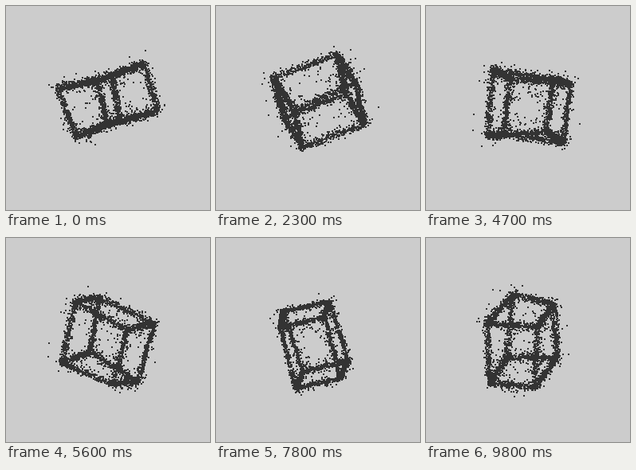
An HTML page with a canvas for the animation above (10000 ms loop, 256 by 256 pixels).

```html
<!DOCTYPE html>
<html>
<head>
<meta charset="utf-8">
<style>
html, body { margin: 0; width: 100%; height: 100%; overflow: hidden; background: #ccc; }
canvas { display: block; }
</style>
</head>
<body>
<canvas id="stage" width="256" height="256"></canvas>
<script>
const ctx = document.getElementById('stage').getContext('2d');
const LOOP = 10000;

// Key poses of the tumbling box: time, scatter, then the x,y of its 8 corners.
// The bits of a corner's index tell its side along each of the three axes.
const poses = [
  { t: 0, spread: 1, at: [65,104, 88,164, 133,87, 143,145, 115,95, 126,147, 173,72, 190,132] },
  { t: 2300, spread: 1.1, at: [72,90, 98,131, 152,61, 175,97, 86,140, 108,178, 163,110, 187,148] },
  { t: 3800, spread: 1.1, at: [80,82, 97,110, 162,72, 175,93, 86,162, 93,175, 164,131, 179,162] },
  { t: 5600, spread: 1, at: [87,80, 118,75, 152,115, 186,107, 70,157, 105,143, 135,183, 166,180] },
  { t: 6900, spread: 0.65, at: [87,86, 136,71, 130,146, 180,132, 71,134, 115,119, 110,195, 158,180] },
  { t: 8600, spread: 0.85, at: [82,99, 145,91, 91,183, 153,171, 92,95, 154,84, 96,178, 157,169] },
  { t: 9800, spread: 1.05, at: [76,108, 140,112, 80,182, 137,187, 109,71, 160,83, 101,150, 165,150] }
];

let seed = 7;
function random() {
  seed = (Math.imul(seed, 1664525) + 1013904223) >>> 0;
  return seed / 4294967296;
}
const gauss = () => (random() + random() + random() + random() - 2) * 1.73;

const grains = [];
for (let axis = 1; axis < 8; axis *= 2) {
  for (let from = 0; from < 8; from++) {
    if (from & axis) continue;
    for (let n = 0; n < 290; n++) {
      const kind = random();
      const size = kind < 0.78 ? 1.9 : kind < 0.97 ? 4 : 7.5;
      grains.push({
        from, to: from | axis, along: random(),
        dx: gauss() * size, dy: gauss() * size,
        inward: random() < 0.03 ? random() * 0.6 : 0
      });
    }
  }
}

// Smooth cubic through the key poses
function poseAt(time) {
  let i = 0;
  while (i < poses.length - 2 && time >= poses[i + 1].t) i++;
  const p = poses[i], q = poses[i + 1];
  const before = poses[Math.max(i - 1, 0)];
  const after = poses[Math.min(i + 2, poses.length - 1)];
  const span = q.t - p.t, u = (time - p.t) / span, v = 1 - u;
  const at = p.at.map((a, k) => {
    const b = q.at[k];
    const slopeA = (b - before.at[k]) / (q.t - before.t) * span;
    const slopeB = (after.at[k] - a) / (after.t - p.t) * span;
    return a * v * v * (1 + 2 * u) + b * u * u * (3 - 2 * u) + slopeA * u * v * v - slopeB * u * u * v;
  });
  return { at, spread: p.spread * v + q.spread * u };
}

// Ten moves per 1100 ms, then one step of rest
function heldTime(ms) {
  const step = Math.floor(ms / 100);
  return 100 * (step && step % 11 === 0 ? step - 1 : step);
}

function draw(now) {
  const { at, spread } = poseAt(heldTime(now % LOOP));
  let cx = 0, cy = 0;
  for (let k = 0; k < 16; k += 2) {
    cx += at[k] / 8;
    cy += at[k + 1] / 8;
  }
  ctx.fillStyle = '#ccc';
  ctx.fillRect(0, 0, 256, 256);
  ctx.fillStyle = '#333';
  for (const g of grains) {
    const a = g.from * 2, b = g.to * 2;
    let x = at[a] + (at[b] - at[a]) * g.along;
    let y = at[a + 1] + (at[b + 1] - at[a + 1]) * g.along;
    x += (cx - x) * g.inward + g.dx * spread;
    y += (cy - y) * g.inward + g.dy * spread;
    ctx.fillRect(Math.round(x - 1), Math.round(y - 1), 2, 2);
  }
}

const start = performance.now();
function tick() {
  draw(performance.now() - start);
  requestAnimationFrame(tick);
}
tick();
</script>
</body>
</html>
```
